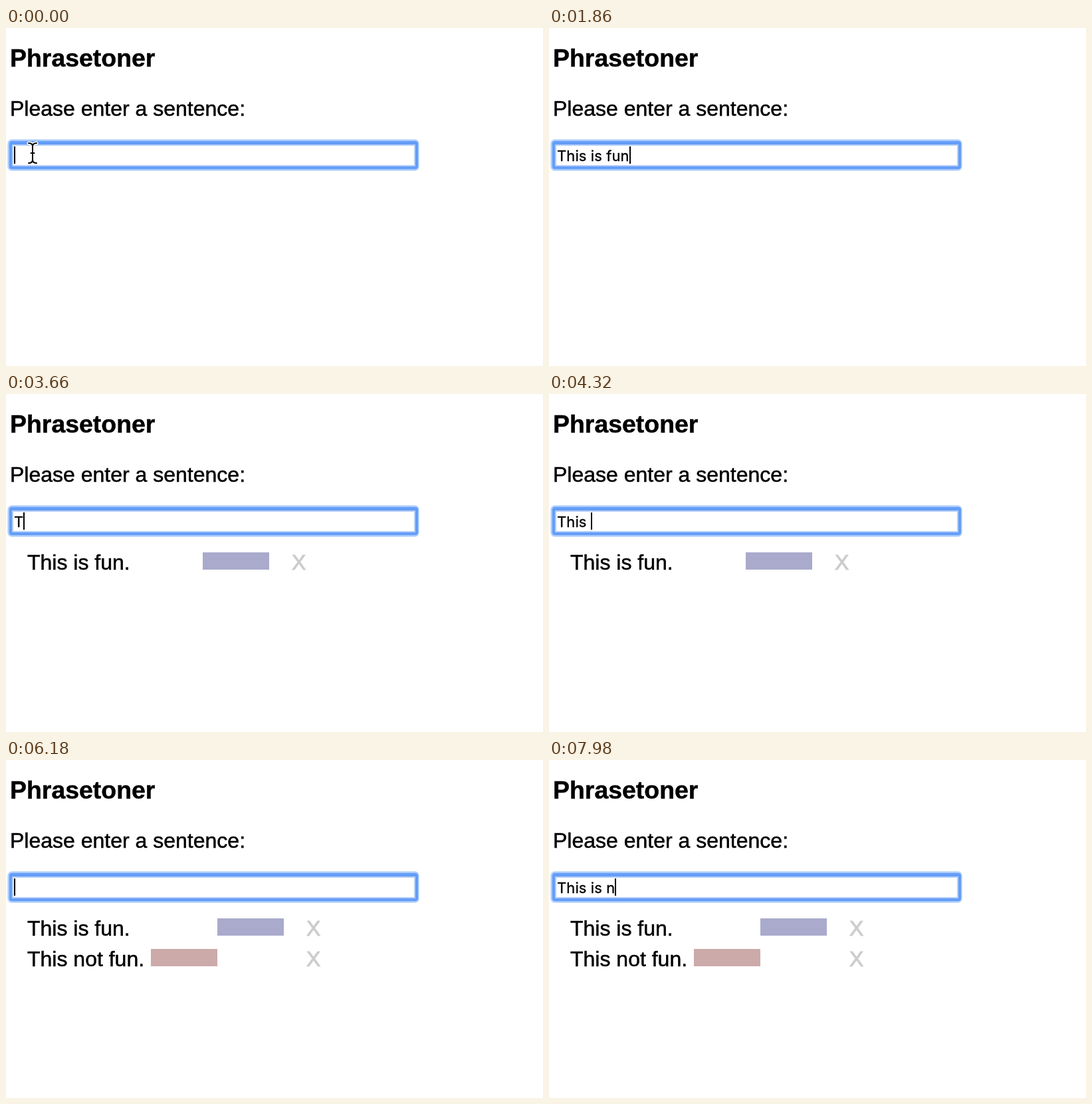
An HTML page that plays this animation: 808 by 508 pixels, repeating every 8 s.

```html
<!DOCTYPE html>
<html lang="en">
<head>
<meta charset="utf-8">
<title>Phrasetoner</title>
<style>
  html, body { margin: 0; width: 100%; height: 100%; overflow: hidden; background: #fff; }
  svg { display: block; width: 808px; height: 508px; }
  text { white-space: pre; stroke: #000; stroke-width: .5px; }
  .body { font: 32px "Liberation Sans", Arial, sans-serif; }
  .title { font: bold 37.44px "Liberation Sans", Arial, sans-serif; }
  .field { font: 22px Inter, sans-serif; letter-spacing: .1px; stroke-width: .3px; }
  .close { fill: #ccc; stroke: #ccc; stroke-width: 1px; }
</style>
</head>
<body>
<svg viewBox="0 0 808 508">
  <rect width="808" height="508" fill="#fff"/>
  <text class="title" x="6" y="58">Phrasetoner</text>
  <text class="body" x="6" y="132">Please enter a sentence:</text>

  <rect x="2" y="167" width="620" height="48" rx="7" fill="#d0e3fd"/>
  <rect x="3" y="168" width="618" height="46" rx="6" fill="#a9cbfb"/>
  <rect x="5" y="170" width="615" height="42" rx="4" fill="#649df8"/>
  <rect x="9" y="175" width="607" height="33" fill="#b4cef7"/>
  <rect x="11" y="177" width="603" height="29" fill="#fff"/>
  <text id="typed" class="field" x="12" y="200"></text>
  <rect id="caret" x="12" y="178" width="2" height="26"/>

  <g id="row1">
    <text class="body" x="32" y="264">This is fun.</text>
    <g id="score1">
      <rect x="296" y="238" width="100" height="26" fill="#aaaacc"/>
      <text class="body close" x="430" y="264">X</text>
    </g>
  </g>
  <g id="row2">
    <text class="body" x="32" y="310">This not fun.</text>
    <rect x="218" y="284" width="100" height="26" fill="#ccaaaa"/>
    <text class="body close" x="452" y="310">X</text>
  </g>

  <g id="pointer" fill="none" stroke-linecap="round">
    <path id="beam" stroke="#fff" stroke-width="5"
      d="M34 173Q40 173 40 178V198Q40 203 34 203M46 173Q40 173 40 178V198Q40 203 46 203M37.5 188H42.5"/>
  </g>
</svg>
<script>
const LOOP = 8000, BLINK = 500;
const $ = id => document.getElementById(id);
const typed = $("typed"), caret = $("caret"), beam = $("beam");

// Dark stroke over the white outline of the pointer.
const ink = beam.cloneNode();
ink.removeAttribute("id");
ink.setAttribute("stroke", "#000");
ink.setAttribute("stroke-width", "2");
beam.after(ink);

// Key press times for each sentence, and the time it is submitted.
const entries = [
  { text: "This is fun.", enter: 2580,
    keys: [600, 720, 840, 960, 1080, 1200, 1320, 1500, 1620, 1740, 1860, 2040] },
  { text: "This not fun.", enter: 6060,
    keys: [3660, 3780, 3900, 4020, 4200, 4560, 4740, 4860, 5040, 5280, 5400, 5520, 5700] },
  { text: "This is n", enter: LOOP,
    keys: [6960, 7080, 7200, 7320, 7440, 7560, 7680, 7800, 7920] }
];
const presses = [0, ...entries.flatMap(e => [...e.keys, e.enter])];

const show = (el, on) => el.setAttribute("visibility", on ? "visible" : "hidden");

function draw(t) {
  const entry = entries.find(e => t < e.enter);
  const count = entry.keys.filter(k => k <= t).length;
  typed.textContent = entry.text.slice(0, count);
  caret.setAttribute("x", Math.round(12 + (count ? typed.getComputedTextLength() : 0)));

  // The caret stays lit after a press, then blinks.
  const last = Math.max(...presses.filter(p => p <= t));
  show(caret, Math.floor((t - last) / BLINK) % 2 === 0);

  show($("pointer"), t < entries[0].keys[0]);
  show($("row1"), t >= entries[0].enter);
  const second = t >= entries[1].enter;
  show($("row2"), second);
  $("score1").setAttribute("transform", `translate(${second ? 22 : 0} 0)`);
}

const start = performance.now();
function tick() {
  draw((performance.now() - start) % LOOP);
  requestAnimationFrame(tick);
}
tick();
</script>
</body>
</html>
```
